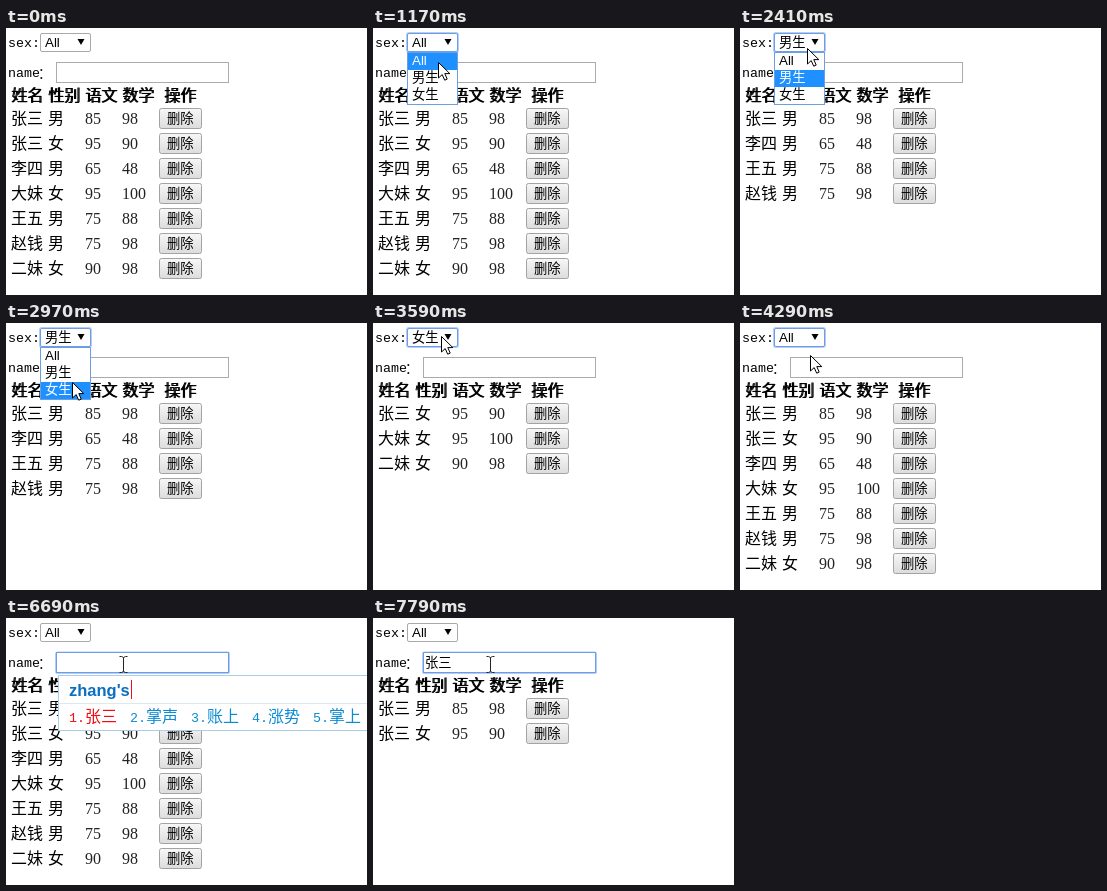
An HTML page that plays this animation: 361x267 px, repeating every 8 s.

```html
<!DOCTYPE html>
<html lang="zh-CN">
<head>
<meta charset="utf-8">
<title>成绩表</title>
<style>
html, body { margin: 0; width: 100%; height: 100%; overflow: hidden; background: #fff; }
svg { display: block; }
text { font: 300 16px "Noto Sans CJK SC", "Noto Sans CJK", sans-serif; fill: #000; white-space: pre; }
.mono { font: 13.33px "Liberation Mono", monospace; }
.num { font: 16px "Liberation Serif", serif; fill: #222; }
.ui { font: 13.33px "Liberation Sans", "Noto Sans CJK SC", "Noto Sans CJK", sans-serif; }
.pinyin { font: bold 16.5px "Liberation Sans", sans-serif; fill: #0a6fc0; }
</style>
</head>
<body>
<svg id="stage" width="361" height="267" viewBox="0 0 361 267">
  <defs>
    <linearGradient id="face" x1="0" y1="0" x2="0" y2="1">
      <stop offset="0" stop-color="#f7f7f7"/><stop offset="1" stop-color="#dcdcdc"/>
    </linearGradient>
  </defs>
</svg>
<script>
const LOOP = 8000;
const BLUE = '#0a8bd2', RED = '#f20c14';
const stage = document.getElementById('stage');

function add(parent, tag, attrs = {}, str) {
  const node = document.createElementNS('http://www.w3.org/2000/svg', tag);
  for (const key in attrs) node.setAttribute(key, attrs[key]);
  if (str !== undefined) node.textContent = str;
  parent.appendChild(node);
  return node;
}
const group = (parent = stage) => add(parent, 'g');
const text = (parent, x, y, str, cls = '') => add(parent, 'text', { x, y, class: cls }, str);
const rect = (parent, x, y, width, height, attrs) => add(parent, 'rect', { x, y, width, height, ...attrs });
const show = (node, on) => node.setAttribute('display', on ? 'inline' : 'none');
const set = (node, attrs) => { for (const key in attrs) node.setAttribute(key, attrs[key]); };

// Value of the last step that has begun.
const at = (steps, t) => steps.reduce((value, step) => (t >= step[0] ? step[1] : value), steps[0][1]);

const options = ['All', '男生', '女生'];
const chosen = [[0, 0], [1710, 1], [3190, 2], [4290, 0]];
const filter = [[0, 0], [1790, 1], [3270, 2], [4290, 0]];
const opened = [[0, 0], [1010, 1], [1710, 0], [2350, 1], [3190, 0], [3670, 1], [4290, 0]];
const focus = [[0, ''], [1010, 'sex'], [4990, 'name']];
const typed = [[0, ''], [7250, '张三']];
const caretOn = [[0, 0], [4990, 1], [5530, 0], [5990, 1], [6550, 0], [7090, 1], [7790, 0]];
const pinyin = [[0, ''], [5990, 'z'], [6150, 'zh'], [6310, 'zha'], [6390, 'zhan'],
  [6550, 'zhang'], [6690, "zhang's"], [7250, '']];
const candidates = {
  z: '在 中 再 则 做',
  zh: '这 中 中国 只 着',
  zha: '炸 扎 渣 眨 诈',
  zhan: '站 占 战 展 沾',
  zhang: '张 章 长 涨 掌',
  "zhang's": '张三 掌声 账上 涨势 掌上'
};

// Pointer moves: start, end, positions, from x, y, to x, y.
const moves = [
  [70, 694, 9, 228, 223, 27, 24],
  [772, 850, 2, 46, 18, 65, 15],
  [1010, 1170, 3, 65, 20, 65, 34],
  [1410, 1490, 2, 65, 40, 66, 46],
  [1950, 1950, 1, 68, 49, 68, 49],
  [2110, 2270, 3, 68, 32, 67, 20],
  [2490, 2890, 6, 67, 25, 66, 56],
  [2970, 2970, 1, 66, 59, 66, 59],
  [3270, 3510, 4, 66, 50, 68, 13],
  [3750, 3970, 4, 68, 20, 70, 32],
  [4370, 4590, 4, 78, 36, 117, 46]
];

function pointer(t) {
  const move = moves.filter(m => t >= m[0]).pop();
  if (!move || (t >= 1710 && t < 1950)) return null;
  const [start, end, count, x0, y0, x1, y1] = move;
  const span = end - start;
  const p = span ? Math.min(1, Math.floor((t - start) / span * (count - 1) + 1e-6) / (count - 1)) : 1;
  return [Math.round(x0 + (x1 - x0) * p), Math.round(y0 + (y1 - y0) * p)];
}

// Labels and table
text(stage, 2, 19, 'sex:', 'mono');
text(stage, 2, 49, 'name', 'mono');
text(stage, 32, 50, '：', 'ui');

// Headings are struck twice, one pixel apart.
[['姓名', 5], ['性别', 42], ['语文', 79], ['数学', 116], ['操作', 158]].forEach(([str, x]) => {
  text(stage, x, 73, str);
  text(stage, x + 1, 73, str);
});

const people = [
  ['张三', '男', 85, 98], ['张三', '女', 95, 90], ['李四', '男', 65, 48], ['大妹', '女', 95, 100],
  ['王五', '男', 75, 88], ['赵钱', '男', 75, 98], ['二妹', '女', 90, 98]
];
const rows = people.map(([name, sex, chinese, maths]) => {
  const node = group();
  text(node, 5, 16, name);
  text(node, 42, 16, sex);
  text(node, 79, 16, chinese, 'num');
  text(node, 116, 16, maths, 'num');
  rect(node, 153.5, 0.5, 42, 20, { rx: 2, fill: 'url(#face)', stroke: '#a3a3a3' });
  text(node, 161, 15, '删除', 'ui');
  return { node, name, sex };
});

// Name field
const ring = { fill: 'none', stroke: '#b4cdf5', 'stroke-width': 2 };
const fieldRing = rect(stage, 50, 34.5, 173, 20.5, { rx: 1.5, ...ring });
const field = rect(stage, 50.5, 34.5, 172, 20, { fill: '#fff' });
const fieldText = text(stage, 52, 49, '', 'ui');
const caret = rect(stage, 52, 37, 1, 15, { fill: '#000' });

// Sex list
const selectRing = rect(stage, 34, 5, 51, 19, { rx: 2, ...ring });
const select = rect(stage, 34.5, 5.5, 50, 18, { rx: 1.5, fill: '#fff' });
const selectText = text(stage, 39, 19, '', 'ui');
add(stage, 'path', { d: 'M71.5 11H78.5L75 17Z' });

const list = group();
rect(list, 34.5, 24.5, 50, 52, { fill: '#fff', stroke: '#6c9fe0' });
const items = options.map((str, i) => ({
  bar: rect(list, 35, 25 + 17 * i, 49, 17),
  label: text(list, 39, 37 + 17 * i, str, 'ui')
}));

// Input method window
const ime = group();
const imeBox = rect(ime, 52.5, 57.5, 296, 55, { fill: '#fff', stroke: '#a9cfe6' });
const imeLine = rect(ime, 53, 85, 295, 1, { fill: '#dde8ef' });
const imeText = text(ime, 63, 78, '', 'pinyin');
const imeCaret = rect(ime, 72, 62, 1, 19, { fill: RED });
const imeItems = Array.from({ length: 5 }, () => ({
  digit: text(ime, 0, 104, '', 'mono'),
  word: text(ime, 0, 104, '')
}));
const imeEnd = group(ime);
add(imeEnd, 'circle', { cx: 333, cy: 74, r: 15.5, fill: '#f59d76' });
const tool = (x, w, d, fill) => {
  rect(imeEnd, x, 91.5, w, 14, { fill: '#fff', stroke: '#d3e2ec' });
  add(imeEnd, 'path', { d, fill });
};
tool(288.5, 14, 'M297.5 95V102L293.5 98.5Z', '#c3c9ce');
tool(302.5, 14, 'M307.5 95V102L311.5 98.5Z', BLUE);
tool(325.5, 15, 'M329 97H337L333 101Z', BLUE);

// Pointers
const arrow = add(stage, 'path', {
  d: 'M.5 .5V16L4.2 12.6L6.7 18.2L9.2 17.1L6.8 11.6H11.8Z', fill: '#fff', stroke: '#000'
});
const beam = add(stage, 'path', {
  d: 'M-3.5 -7.5H-1.5L.5 -6.5L2.5 -7.5H4.5M.5 -6.5V7.5M-3.5 8.5H-1.5L.5 7.5L2.5 8.5H4.5',
  fill: 'none', stroke: '#222'
});

function drawTable(t) {
  const sex = ['', '男', '女'][at(filter, t)];
  const name = at(typed, t);
  let line = 0;
  for (const row of rows) {
    const on = row.sex.includes(sex) && row.name.includes(name);
    show(row.node, on);
    if (on) row.node.setAttribute('transform', `translate(0 ${80 + 25 * line++})`);
  }
}

function drawForm(t, tip) {
  const focused = at(focus, t);
  const name = at(typed, t);
  show(fieldRing, focused === 'name');
  show(selectRing, focused === 'sex');
  set(field, { stroke: focused === 'name' ? '#6f9ce8' : '#ababab' });
  set(select, { stroke: focused === 'sex' ? '#6f9ce8' : '#a9a9a9' });
  fieldText.textContent = name;
  show(caret, at(caretOn, t));
  set(caret, { x: name ? 79 : 52 });

  const value = at(chosen, t);
  selectText.textContent = options[value];
  show(list, at(opened, t));
  const hot = tip && tip[1] >= 25 ? Math.min(2, Math.floor((tip[1] - 25) / 17)) : value;
  items.forEach(({ bar, label }, i) => {
    set(bar, { fill: i === hot ? '#1e90ff' : '#fff' });
    label.style.fill = i === hot ? '#fff' : '#000';
  });
}

function drawIme(t) {
  const keys = at(pinyin, t);
  show(ime, keys);
  if (!keys) return;
  imeText.textContent = keys;
  set(imeCaret, { x: Math.round(64 + imeText.getComputedTextLength()) });
  let x = 63;
  candidates[keys].split(' ').forEach((str, i) => {
    const { digit, word } = imeItems[i];
    digit.textContent = `${i + 1}.`;
    word.textContent = str;
    set(digit, { x });
    set(word, { x: x + 16 });
    digit.style.fill = word.style.fill = i ? BLUE : RED;
    x += 29 + 16 * str.length;
  });
  const extra = x - 288;
  set(imeBox, { width: 296 + extra });
  set(imeLine, { width: 295 + extra });
  set(imeEnd, { transform: `translate(${extra} 0)` });
}

function drawPointer(t, tip) {
  const overField = tip && !at(opened, t) && tip[0] >= 50 && tip[0] < 223 && tip[1] >= 34 && tip[1] < 55;
  show(arrow, tip && !overField);
  show(beam, overField);
  if (tip) set(overField ? beam : arrow, { transform: `translate(${tip[0]} ${tip[1]})` });
}

function render(t) {
  const tip = pointer(t);
  drawTable(t);
  drawForm(t, tip);
  drawIme(t);
  drawPointer(t, tip);
}

const begin = performance.now();
function tick() {
  render((performance.now() - begin) % LOOP);
  requestAnimationFrame(tick);
}
render(0);
requestAnimationFrame(tick);
</script>
</body>
</html>
```
